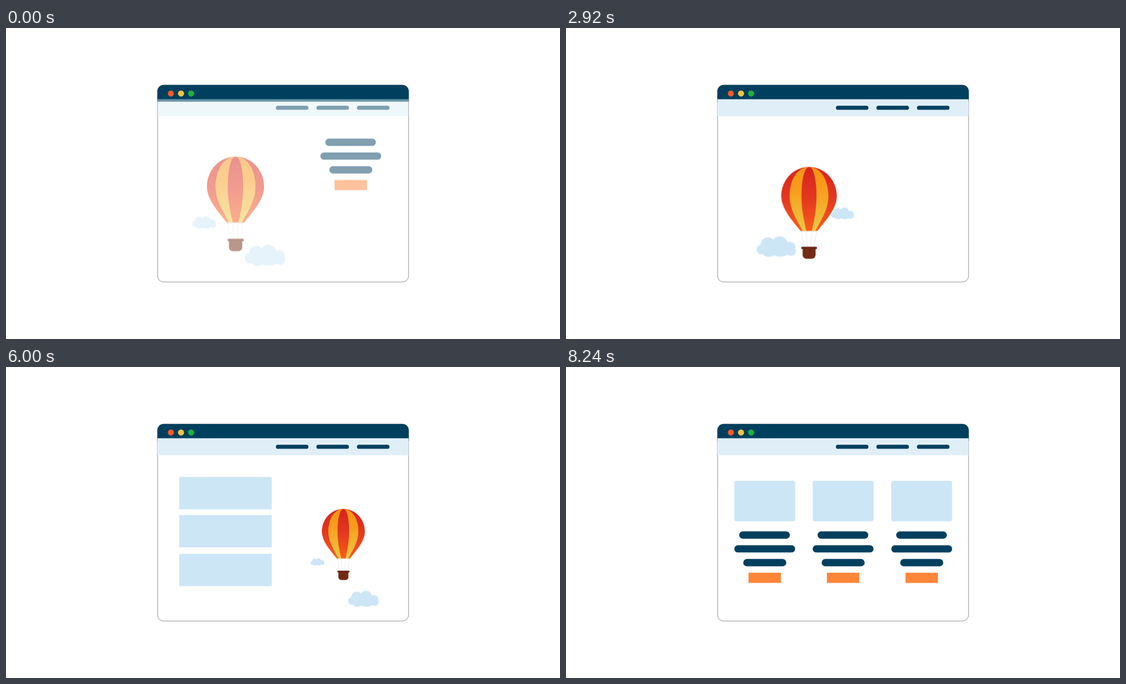
Write an HTML page that moves like this. It is 998 px wide and 561 px high and loops after 10000 ms.

```html
<!DOCTYPE html>
<html lang="en">
<head>
<meta charset="utf-8">
<title>Balloon website</title>
<style>
  :root {
    --in-out: cubic-bezier(.65, 0, .35, 1);
    --sine: cubic-bezier(.37, 0, .63, 1);
    --out: cubic-bezier(.5, 1, .89, 1);
    --out-cubic: cubic-bezier(.215, .61, .355, 1);
  }
  html, body { margin: 0; width: 100%; height: 100%; overflow: hidden; background: #fff; }
  svg { display: block; width: 100vw; height: 100vh; }

  .navy { fill: #003f5e; }
  .sky { fill: #cde6f6; }
  .orange { fill: #ff8539; }

  .nav, .intro, .scene, .balloon, .big, .small, .dip, .blocks, .block, .cards, .card {
    animation: 10s linear infinite backwards;
  }

  .nav { animation-name: nav; }
  @keyframes nav {
    0% { opacity: .5; animation-timing-function: var(--out); }
    9%, 100% { opacity: 1; }
  }

  .intro { animation-name: intro; }
  @keyframes intro {
    0% { opacity: .5; transform: translateY(-34.5px); animation-timing-function: var(--out); }
    9% { opacity: 1; transform: none; }
    20% { opacity: 1; transform: translateY(0); animation-timing-function: var(--sine); }
    27.6%, 100% { opacity: 0; transform: translateY(-64px); }
  }

  .scene { animation-name: scene; }
  @keyframes scene {
    0% { opacity: .5; transform: translateY(18.5px); animation-timing-function: var(--out); }
    9% { opacity: 1; transform: translateY(0); }
    63.6% { opacity: 1; transform: translateY(0); animation-timing-function: var(--sine); }
    71.2%, 100% { opacity: 0; transform: translateY(-100px); }
  }

  .balloon { animation-name: balloon; }
  @keyframes balloon {
    0% { transform: translate(362px, 213.5px) scale(1); }
    8% { transform: translate(362px, 213.5px) scale(1); animation-timing-function: var(--in-out); }
    20% { transform: translate(364px, 246px) scale(1); }
    28% { transform: translate(364px, 246px) scale(1); animation-timing-function: var(--in-out); }
    38.7% { transform: translate(569px, 285.7px) scale(.752); }
    52.4% { transform: translate(569px, 285.7px) scale(.752); animation-timing-function: var(--in-out); }
    63.4%, 100% { transform: translate(569px, 254px) scale(.752); }
  }

  .big { animation-name: big; }
  @keyframes big {
    0% { transform: translate(430px, 372.5px) scale(1); }
    8% { transform: translate(430px, 372.5px) scale(1); animation-timing-function: var(--in-out); }
    20% { transform: translate(320px, 373px) scale(1); }
    28% { transform: translate(320px, 373px) scale(1); animation-timing-function: var(--in-out); }
    38.7% { transform: translate(521px, 396.2px) scale(.753); }
    52.4% { transform: translate(521px, 396.2px) scale(.753); animation-timing-function: var(--in-out); }
    67%, 100% { transform: translate(636.7px, 396.8px) scale(.753); }
  }

  .dip { animation-name: dip; }
  @keyframes dip {
    0% { transform: translateY(0); }
    52.4% { transform: translateY(0); animation-timing-function: var(--sine); }
    59.2% { transform: translateY(8px); animation-timing-function: var(--sine); }
    66%, 100% { transform: translateY(0); }
  }

  .small { animation-name: small; }
  @keyframes small {
    0% { transform: translate(335.3px, 320.8px) scale(.589); }
    8% { transform: translate(335.3px, 320.8px) scale(.589); animation-timing-function: var(--in-out); }
    20% { transform: translate(454.3px, 321px) scale(.589); }
    28% { transform: translate(454.3px, 321px) scale(.589); animation-timing-function: var(--in-out); }
    38.7% { transform: translate(655.7px, 344.3px) scale(.336); }
    52.4% { transform: translate(655.7px, 344.3px) scale(.336); animation-timing-function: var(--in-out); }
    67%, 100% { transform: translate(525.7px, 345.2px) scale(.336); }
  }

  .blocks { animation-name: leave; }
  @keyframes leave {
    0% { opacity: 1; transform: translateY(0); }
    63.6% { opacity: 1; transform: translateY(0); animation-timing-function: var(--sine); }
    71.2%, 100% { opacity: 0; transform: translateY(-100px); }
  }

  .block { animation-name: grow; transform-box: fill-box; transform-origin: center; }
  @keyframes grow {
    0% { opacity: 0; transform: scaleX(.5); }
    30.1% { opacity: 0; transform: scaleX(.5); animation-timing-function: var(--out); }
    43.5%, 75% { opacity: 1; transform: scaleX(1); }
    75.01%, 100% { opacity: 0; transform: scaleX(1); }
  }
  .block:nth-child(2) { animation-delay: .5s; }
  .block:nth-child(3) { animation-delay: 1s; }

  .cards { animation-name: show; }
  @keyframes show {
    0%, 69% { opacity: 0; }
    69.01%, 100% { opacity: 1; }
  }

  .card { animation-name: rise; }
  @keyframes rise {
    0% { opacity: 0; transform: translateY(104px); }
    69.6% { opacity: 0; transform: translateY(104px); animation-timing-function: var(--out-cubic); }
    79.1%, 100% { opacity: 1; transform: translateY(0); }
  }
  .card:nth-child(2) { animation-delay: .18s; }
  .card:nth-child(3) { animation-delay: .36s; }
</style>
</head>
<body>
<svg viewBox="0 0 998 561" preserveAspectRatio="none">
  <defs>
    <linearGradient id="red" x1="0" y1="0" x2="0" y2="1">
      <stop offset="0" stop-color="#d6231f"/>
      <stop offset=".5" stop-color="#e43a20"/>
      <stop offset="1" stop-color="#fc5c1a"/>
    </linearGradient>
    <linearGradient id="yellow" x1="0" y1="0" x2="0" y2="1">
      <stop offset="0" stop-color="#f99416"/>
      <stop offset=".35" stop-color="#f99d1c"/>
      <stop offset="1" stop-color="#e9cb45"/>
    </linearGradient>
    <g id="cloud" class="sky">
      <circle cx="9.3" cy="24.3" r="9.3"/>
      <circle cx="21" cy="15" r="13"/>
      <circle cx="43" cy="14.5" r="14.5"/>
      <circle cx="62" cy="20.5" r="10.5"/>
      <circle cx="64" cy="27.3" r="9"/>
      <ellipse cx="23" cy="27" rx="13" ry="11.4"/>
      <ellipse cx="44" cy="26" rx="18" ry="12"/>
    </g>
    <g id="copy">
      <g class="navy">
        <rect x="312" y="296.5" width="91.3" height="13.2" rx="6.6"/>
        <rect x="303.2" y="321.4" width="109.6" height="13.2" rx="6.6"/>
        <rect x="319.3" y="346.3" width="77.5" height="13.2" rx="6.6"/>
      </g>
      <rect class="orange" x="328.8" y="371.1" width="58.4" height="18.4"/>
    </g>
    <g id="product">
      <rect class="sky" x="303.2" y="205.2" width="109.6" height="73" rx="4"/>
      <use href="#copy"/>
    </g>
  </defs>

  <!-- browser window -->
  <rect x="273" y="103" width="452.2" height="355.2" rx="11" fill="#fff" stroke="#808285" stroke-width=".9"/>
  <path class="navy" d="M272.7 133V114a11.3 11.3 0 0 1 11.3-11.3H714.2a11.3 11.3 0 0 1 11.3 11.3V133Z"/>
  <circle cx="297" cy="118.2" r="5.5" fill="#f15a29"/>
  <circle cx="315.3" cy="118.2" r="5.5" fill="#f5c342"/>
  <circle cx="333.5" cy="118.2" r="5.5" fill="#1eb140"/>
  <g class="nav">
    <rect x="273" y="128.5" width="452.2" height="30.7" fill="#e0eff7"/>
    <g class="navy">
      <rect x="486.2" y="140.2" width="58.6" height="7.4" rx="3.7"/>
      <rect x="559.2" y="140.2" width="58.6" height="7.4" rx="3.7"/>
      <rect x="632.2" y="140.2" width="58.6" height="7.4" rx="3.7"/>
    </g>
  </g>

  <g class="intro"><use href="#copy" x="263.1" y="-62.5"/></g>

  <g class="blocks">
    <rect class="block sky" x="312" y="198.4" width="166.7" height="58.2"/>
    <rect class="block sky" x="312" y="267.1" width="166.7" height="58.2"/>
    <rect class="block sky" x="312" y="337.1" width="166.7" height="58.2"/>
  </g>

  <g class="scene">
    <g class="balloon">
      <path d="M37 119L42 149M46 119L48.3 149M56.5 119L54.5 149M65.5 119L60.5 149" fill="none" stroke="#e6e4e4" stroke-width=".9"/>
      <path d="M51.5 0C80 0 103 24 103 54C103 78 82 100 67 119H36C21 100 0 78 0 54C0 24 23 0 51.5 0Z" fill="url(#red)"/>
      <path d="M51.5 0C30 0 15.5 24 15.5 54C15.5 80 31 102 40 119H63C72 102 87.5 80 87.5 54C87.5 24 73 0 51.5 0Z" fill="url(#yellow)"/>
      <path d="M51.5 0C43 0 37.5 24 37.5 54C37.5 80 43 104 46.5 119H56.5C60 104 65.3 80 65.3 54C65.3 24 60 0 51.5 0Z" fill="url(#red)"/>
      <rect x="36" y="118.6" width="31" height="1.6" fill="#eadccb"/>
      <path d="M39.6 150H63.6V163.5a7 7 0 0 1-7 7H46.6a7 7 0 0 1-7-7Z" fill="#742b15"/>
      <rect x="37" y="148.2" width="29.4" height="4.4" rx="2.2" fill="#6b2411"/>
    </g>
    <g class="small"><use href="#cloud"/></g>
    <g class="dip"><g class="big"><use href="#cloud"/></g></g>
  </g>

  <g class="cards">
    <g class="card"><use href="#product"/></g>
    <g class="card"><use href="#product" x="141.2"/></g>
    <g class="card"><use href="#product" x="282.8"/></g>
  </g>
</svg>
</body>
</html>
```
